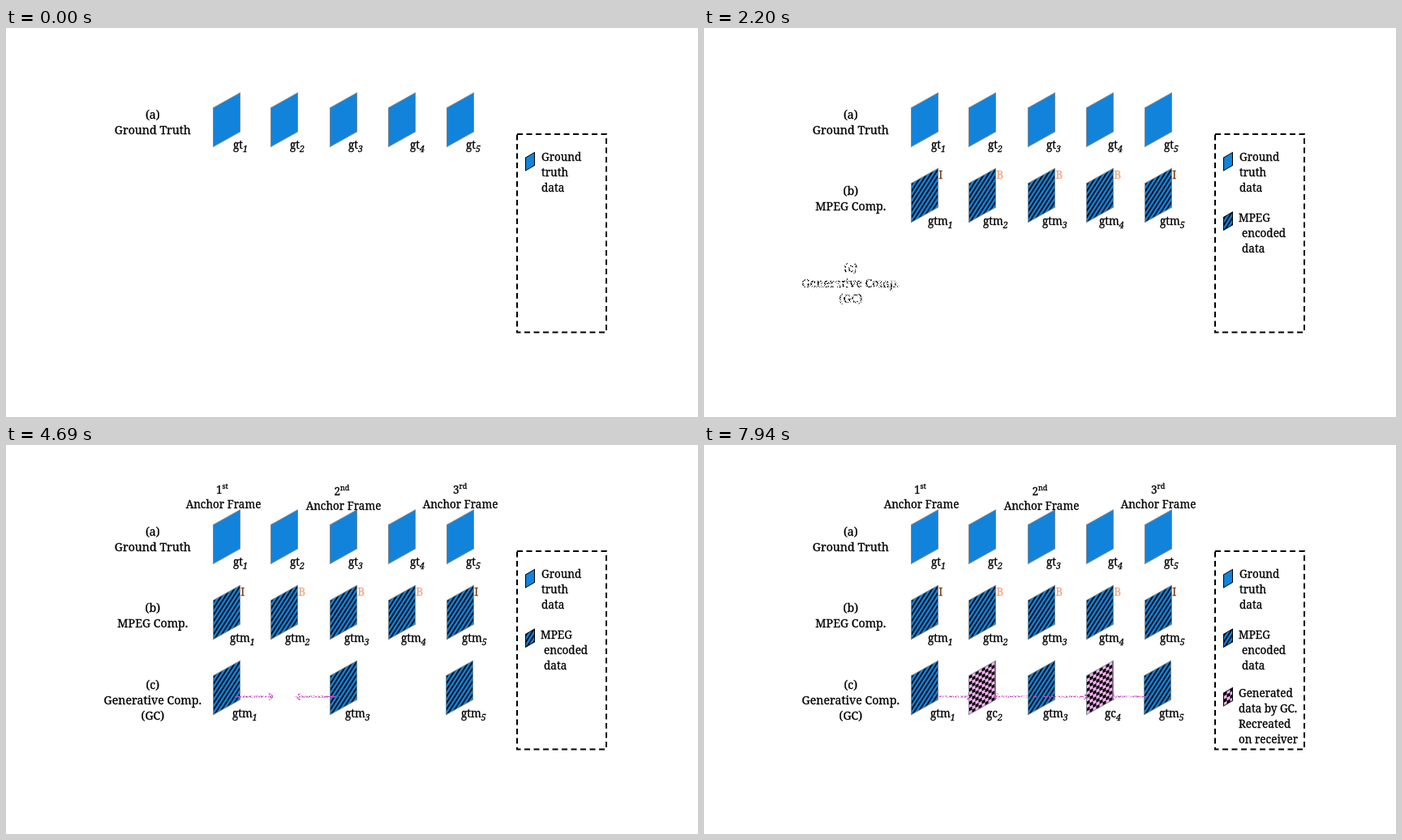
These frames come from a looping animation (853x480 px, 8000 ms). An HTML page with a canvas:

```html
<!DOCTYPE html>
<html lang="en">
<head>
<meta charset="utf-8">
<title>Compression schemes</title>
<style>
  html, body { margin: 0; width: 100%; height: 100%; overflow: hidden; background: #fff; }
  canvas { display: block; }
</style>
</head>
<body>
<canvas id="stage" width="853" height="480"></canvas>
<script>
const W = 853, H = 480, LOOP = 8000, STEP = 70, STEPS = 8;
const STARTS = [400, 1230, 1990, 2820, 3650, 4480, 5310, 6140, 6900, 7730];
const BLUE = '#1283da', PINK = '#f5b3f1', MAGENTA = '#d14bc8', GREEN = '#2db68a';
const COLUMNS = [255.5, 326.5, 399.5, 471.5, 543.5];
const ctx = document.getElementById('stage').getContext('2d', { willReadFrequently: true });

// A hairline outline gives the letters a slightly heavier weight
function text(str, x, y, { align = 'left', color = '#000', size = 13.5, style = '' } = {}) {
  ctx.font = `${style} ${size}px "Noto Serif", serif`;
  ctx.textAlign = align;
  ctx.fillStyle = ctx.strokeStyle = color;
  ctx.lineWidth = 0.3;
  ctx.fillText(str, x, y);
  ctx.strokeText(str, x, y);
}

function lines(rows, x, y, options) {
  rows.forEach((row, i) => text(row, x, y + i * 19.1, options));
}

const rowLabel = (rows, y) => lines(rows, 180.8, y, { align: 'center', size: 14.2 });

// Main text followed by a small raised or lowered part
function scripted(str, small, x, y, dy, options) {
  text(str, x, y);
  text(small, x + ctx.measureText(str).width, y + dy, options);
}

const indexed = (str, n, x, y) => scripted(str, n, x, y, 3.5, { size: 10.5, style: 'italic' });

function stripes(w, h) {
  ctx.strokeStyle = '#08131f';
  ctx.lineWidth = 2.6;
  ctx.beginPath();
  for (let x = 2; x < w + h; x += 8) {
    ctx.moveTo(x + 2, -2);
    ctx.lineTo(x - h - 2, h + 2);
  }
  ctx.stroke();
}

function checks(w, h) {
  ctx.fillStyle = '#000';
  for (let y = 0; y < h; y += 4) {
    for (let x = y % 8; x < w; x += 8) ctx.fillRect(x, y, 4, 4);
  }
}

// Slanted sheet; (x, top) is the corner of its bounding box
function sheet(x, top, fill, pattern, w = 33, h = 48, rise = 18.5, edge = '#7c8894') {
  ctx.save();
  ctx.transform(1, -rise / w, 0, 1, x, top + rise);
  ctx.beginPath();
  ctx.rect(0, 0, w, h);
  ctx.fillStyle = fill;
  ctx.fill();
  if (pattern) {
    ctx.save();
    ctx.clip();
    pattern(w, h);
    ctx.restore();
  }
  ctx.strokeStyle = edge;
  ctx.lineWidth = 1;
  ctx.strokeRect(0, 0, w, h);
  ctx.restore();
}

function legend(top, fill, pattern) {
  sheet(640.5, top, fill, pattern, 11, 16, 6.5, '#000');
}

function arrow(x1, x2) {
  const y = 310.5, back = Math.sign(x1 - x2) * 5;
  ctx.strokeStyle = MAGENTA;
  ctx.lineWidth = 1.8;
  ctx.beginPath();
  ctx.moveTo(x1, y);
  ctx.lineTo(x2, y);
  ctx.moveTo(x2 + back, y - 4);
  ctx.lineTo(x2, y);
  ctx.lineTo(x2 + back, y + 4);
  ctx.stroke();
}

function link(dx, y) {
  ctx.strokeStyle = GREEN;
  ctx.lineWidth = 1.9;
  ctx.beginPath();
  ctx.moveTo(269 + dx, y);
  ctx.bezierCurveTo(238 + dx, y + 4, 240 + dx, 290, 266 + dx, 299.5);
  ctx.moveTo(262 + dx, 294);
  ctx.lineTo(266 + dx, 299.5);
  ctx.lineTo(260 + dx, 301.5);
  ctx.stroke();
}

function anchor(n, suffix, x, numX, y) {
  scripted(n, suffix, numX, y, -5.5, { size: 9 });
  text('Anchor Frame', x, y + 18, { align: 'center' });
}

function drawState(n) {
  ctx.fillStyle = '#fff';
  ctx.fillRect(0, 0, W, H);

  ctx.strokeStyle = '#000';
  ctx.lineWidth = 2;
  ctx.setLineDash([7, 4.5]);
  ctx.strokeRect(630, 131, 110, 244.5);
  ctx.setLineDash([]);

  rowLabel(['(a)', 'Ground Truth'], 112);
  COLUMNS.forEach(x => sheet(x, 80, BLUE));
  [280, 350, 422, 498, 567].forEach((x, i) => indexed('gt', i + 1, x, 149));
  legend(153.5, BLUE);
  lines(['Ground', 'truth', 'data'], 660, 164);

  if (n >= 1) rowLabel(['(b)', 'MPEG Comp.'], 206);
  if (n >= 2) {
    COLUMNS.forEach((x, i) => {
      const key = i % 4 === 0;
      sheet(x, 173.3, BLUE, stripes);
      text(key ? 'I' : 'B', x + 33.7, 185.5, { color: key ? '#843c0c' : '#f4a67e' });
    });
    [276, 344, 417, 487, 562].forEach((x, i) => indexed('gtm', i + 1, x, 243));
    legend(227, BLUE, stripes);
    text('MPEG', 659, 239);
    lines(['encoded', 'data'], 663, 258);
  }
  if (n >= 3) rowLabel(['(c)', 'Generative Comp.', '(GC)'], 301);
  if (n >= 4) {
    anchor('1', 'st', 268, 259, 59.5);
    anchor('2', 'nd', 416, 404.5, 61.5);
    anchor('3', 'rd', 560, 551, 59.5);
    [255.5, 399.5, 542.5].forEach(x => sheet(x, 266.3, BLUE, stripes));
    [279, 418, 561].forEach((x, i) => indexed('gtm', 2 * i + 1, x, 336));
  }
  if (n === 4) {
    link(0, 200.5);
    link(147, 206);
    link(290, 206);
  }
  if (n >= 7) {
    sheet(326.5, 266.3, PINK, checks);
    indexed('gc', 2, 348, 336);
    legend(299.5, PINK, checks);
    lines(['Generated', 'data by GC.', 'Recreated', 'on receiver'], 659, 311);
  }
  if (n >= 9) {
    sheet(471.5, 266.3, PINK, checks);
    indexed('gc', 4, 494, 336);
  }
  if (n >= 6 && n < 10) {
    arrow(282, 329);
    arrow(411, 357.5);
  }
  if (n >= 8 && n < 10) {
    arrow(419, 473);
    arrow(551, 502);
  }
}

const states = Array.from({ length: STARTS.length + 1 }, (_, n) => {
  drawState(n);
  return new Uint32Array(ctx.getImageData(0, 0, W, H).data.buffer);
});

let seed = 7;
const noise = Float32Array.from({ length: W * H }, () => {
  seed = (seed + 0x6d2b79f5) | 0;
  let t = Math.imul(seed ^ (seed >>> 15), seed | 1);
  t ^= t + Math.imul(t ^ (t >>> 7), t | 61);
  return ((t ^ (t >>> 14)) >>> 0) / 4294967296;
});

const image = ctx.createImageData(W, H);
const pixels = new Uint32Array(image.data.buffer);
let shown = '';

// Each stage dissolves into the next, pixel by pixel, in even steps
function render(now) {
  const time = now % LOOP;
  const stage = STARTS.filter(start => start <= time).length;
  const step = stage ? Math.min(STEPS, 1 + Math.floor((time - STARTS[stage - 1]) / STEP)) : STEPS;
  const key = stage + ':' + step;
  if (key !== shown) {
    const before = states[Math.max(0, stage - 1)], after = states[stage];
    const part = (step + 0.5) / STEPS;
    for (let i = 0; i < pixels.length; i++) {
      pixels[i] = noise[i] < part ? after[i] : before[i];
    }
    ctx.putImageData(image, 0, 0);
    shown = key;
  }
  requestAnimationFrame(render);
}
render(performance.now());
</script>
</body>
</html>
```
